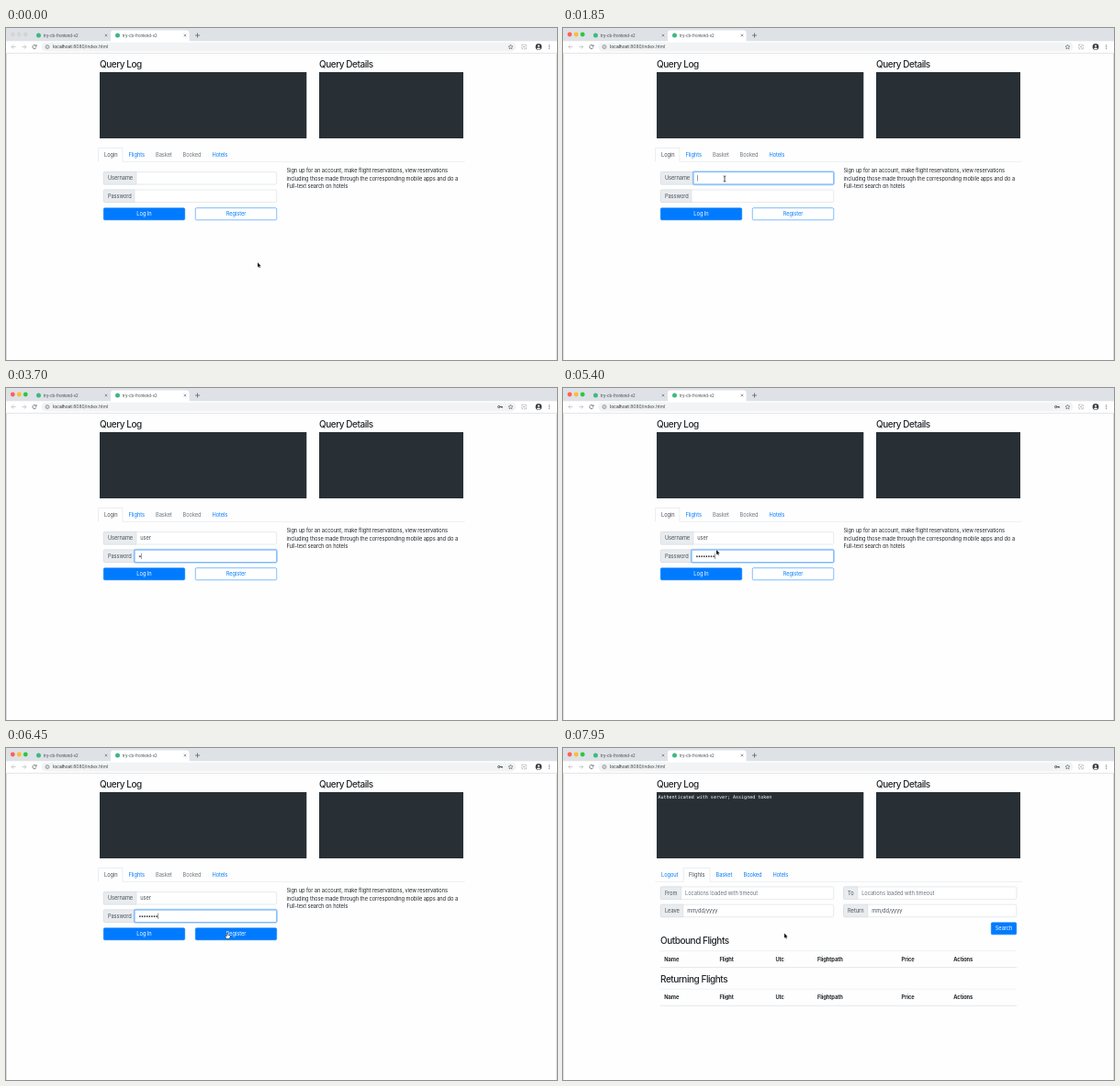
Write an HTML page with a canvas that moves like this. It is 600 px wide and 361 px high and loops after 8000 ms.

```html
<!DOCTYPE html>
<html lang="en">
<head>
<meta charset="utf-8">
<title>Login walkthrough</title>
<style>
html, body { margin: 0; width: 100%; height: 100%; overflow: hidden; background: #fefefe; }
canvas { display: block; width: 600px; height: 361px; }
</style>
</head>
<body>
<canvas id="stage"></canvas>
<script>
const W = 600, H = 361, LOOP = 8000;
const canvas = document.getElementById('stage');
const dpr = window.devicePixelRatio || 1;
canvas.width = W * dpr;
canvas.height = H * dpr;
const ctx = canvas.getContext('2d');

const SANS = 'Inter, "Open Sans", sans-serif';
const MONO = '"DejaVu Sans Mono", monospace';
const BODY = 5.71, HEAD = 10;
const BLUE = '#007bff', INK = '#212529', MUTED = '#6c757d', FIELD_INK = '#495057', LINE = '#dee2e6';

// Moments of the story in ms
const CLICK = 500, TAB_KEY = 3200, SUBMIT = 6850, SWITCH = 6950, KEY_ICON = 3600;
const NAME = 'user';
const nameKeys = [2300, 2620, 2820, 3000];
const passKeys = Array.from({ length: 8 }, (_, i) => 3600 + i * 200);

const cursorPath = [
  [0, 274, 255], [149, 274, 255], [150, 202, 162], [350, 202, 162], [480, 176, 164],
  [5180, 176, 164], [5400, 167, 176], [5650, 155, 202], [5950, 172, 211],
  [6100, 185, 207], [6400, 241, 201.5]
];
const loginButton = [106, 195.4, 89, 13.6];
const registerButton = [206, 195.4, 89, 13.6];

const clamp = v => Math.max(0, Math.min(1, v));
const ramp = (t, from, to) => clamp((t - from) / (to - from));
const typed = (keys, t) => keys.filter(k => k <= t).length;
const inside = (p, [x, y, w, h]) => p.x >= x && p.x <= x + w && p.y >= y && p.y <= y + h;

function text(str, x, y, { size = BODY, color = INK, weight = 400, family = SANS, align = 'left', track = -0.011 } = {}) {
  ctx.font = `${weight} ${size}px ${family}`;
  ctx.letterSpacing = `${track * size}px`;
  ctx.textAlign = align;
  ctx.textBaseline = 'alphabetic';
  ctx.fillStyle = color;
  ctx.fillText(str, x, y + size * 0.36);
}
const heading = (str, x, y) => text(str, x, y, { size: HEAD, track: -0.046, weight: 450 });

function box(x, y, w, h, fill, stroke, radius = 1.4, width = 0.5) {
  ctx.beginPath();
  ctx.roundRect(x, y, w, h, radius);
  if (fill) { ctx.fillStyle = fill; ctx.fill(); }
  if (stroke) { ctx.strokeStyle = stroke; ctx.lineWidth = width; ctx.stroke(); }
}

function dot(x, y, r, fill) {
  ctx.beginPath();
  ctx.arc(x, y, r, 0, 7);
  ctx.fillStyle = fill;
  ctx.fill();
}

function lines(color, width, ...paths) {
  ctx.beginPath();
  for (const p of paths) {
    for (let i = 0; i < p.length; i += 2) ctx[i ? 'lineTo' : 'moveTo'](p[i], p[i + 1]);
  }
  ctx.strokeStyle = color;
  ctx.lineWidth = width;
  ctx.stroke();
}

function ring(x, y, r, color, width, from = 0, to = 7) {
  ctx.beginPath();
  ctx.arc(x, y, r, from, to);
  ctx.strokeStyle = color;
  ctx.lineWidth = width;
  ctx.stroke();
}

function browserTab(x, active) {
  if (active) {
    box(x, 2.5, 85.5, 13, '#fff', null, [3, 3, 0, 0]);
  }
  dot(x + 7.5, 8, 2.5, '#41b883');
  text('try-cb-frontend-v2', x + 13, 8, { size: 4.28, color: '#3c4043' });
  const cx = x + 81, c = 1.3;
  lines('#5f6368', 0.6, [cx - c, 8 - c, cx + c, 8 + c], [cx + c, 8 - c, cx - c, 8 + c]);
}

function star(cx, cy) {
  ctx.beginPath();
  for (let i = 0; i < 10; i++) {
    const a = -Math.PI / 2 + i * Math.PI / 5, r = i % 2 ? 1.2 : 2.6;
    ctx.lineTo(cx + r * Math.cos(a), cy + r * Math.sin(a));
  }
  ctx.closePath();
  ctx.strokeStyle = '#5f6368';
  ctx.lineWidth = 0.6;
  ctx.stroke();
}

function browser(t) {
  ctx.fillStyle = '#dee1e6';
  ctx.fillRect(0, 0, W, 14.5);
  ctx.fillStyle = '#fff';
  ctx.fillRect(0, 14.5, W, 12.5);
  const lights = t < CLICK - 50 ? ['#d9d3d4', '#d9d5d0', '#d1d6d2'] : ['#ff5f57', '#febc2e', '#28c840'];
  lights.forEach((c, i) => dot(7.3 + i * 7, 7, 2.4, c));
  browserTab(28, false);
  browserTab(114, true);
  lines('#5f6368', 0.8, [206, 8, 211, 8], [208.5, 5.5, 208.5, 10.5]);

  const grey = '#5f6368', pale = '#bdc1c6';
  lines(pale, 0.8, [10.5, 20.5, 6, 20.5], [8.2, 18.3, 6, 20.5, 8.2, 22.7]);
  lines(pale, 0.8, [17.5, 20.5, 22, 20.5], [19.8, 18.3, 22, 20.5, 19.8, 22.7]);
  ring(31, 20.5, 2.1, grey, 0.8, 0.4, 5.6);
  lines(grey, 0.8, [33.2, 18.2, 33.2, 19.9, 31.5, 19.9]);
  box(38.5, 15.7, 517, 9.8, '#f1f3f4', null, 5);
  ring(45, 20.5, 2, grey, 0.6);
  lines(grey, 0.6, [45, 20.2, 45, 21.6], [45, 19.2, 45, 19.7]);
  text('localhost', 51, 20.5, { size: 5, color: INK });
  const hostWidth = ctx.measureText('localhost').width;
  text(':8080/index.html', 51 + hostWidth, 20.5, { size: 5, color: '#44484c' });

  if (t >= KEY_ICON) {
    ring(536.7, 20.5, 1.1, '#3c4043', 0.9);
    lines('#3c4043', 0.9, [537.8, 20.5, 540.8, 20.5], [540, 20.5, 540, 21.8]);
  }
  star(549.5, 20.7);
  ctx.setLineDash([1.5, 1]);
  box(561.8, 18.2, 4.6, 4.6, null, '#777', 0, 0.6);
  ctx.setLineDash([]);
  dot(564.1, 20.5, 0.8, '#999');
  dot(580, 20.5, 3.4, '#3c4043');
  dot(580, 19.6, 1.1, '#fff');
  ctx.beginPath();
  ctx.ellipse(580, 22.4, 1.9, 1, 0, 0, 7);
  ctx.fill();
  [-1.8, 0, 1.8].forEach(d => dot(591.5, 20.5 + d, 0.55, grey));
  lines('#dadce0', 0.7, [0, 27.4, W, 27.4]);
}

function queryPanels(t) {
  heading('Query Log', 102, 39.5);
  heading('Query Details', 341, 39.5);
  ctx.fillStyle = '#283035';
  ctx.fillRect(102, 48, 225.3, 72);
  ctx.fillRect(341, 48, 157, 72);
  if (t >= SWITCH) {
    text('Authenticated with server; Assigned token', 103.5, 53.2,
      { size: 5.03, family: MONO, color: '#fff', track: 0 });
  }
}

function tabs(t) {
  const signedIn = t >= SWITCH;
  const items = signedIn
    ? [['Logout', 107], ['Flights', 137], ['Basket', 166.5], ['Booked', 196.5], ['Hotels', 228.5]]
    : [['Login', 107], ['Flights', 133.5], ['Basket', 163], ['Booked', 192.5], ['Hotels', 224.5]];
  const [left, right] = signedIn ? [131.2, 160] : [100.5, 127];
  lines(LINE, 0.6, [100.5, 145.3, left, 145.3], [right, 145.3, 499.5, 145.3],
    [left, 145.3, left, 130.5, right, 130.5, right, 145.3]);
  items.forEach(([label, x], i) => {
    const active = i === (signedIn ? 1 : 0);
    const disabled = !signedIn && (i === 2 || i === 3);
    text(label, x, 137.8, { color: active ? FIELD_INK : disabled ? MUTED : BLUE });
  });
}

function field(label, x, y, split, right, focus = 0) {
  const h = 13.5;
  box(x, y, right - x, h, '#fff', '#ced4da');
  box(x, y, split - x, h, '#e9ecef', '#ced4da', [1.4, 0, 0, 1.4]);
  text(label, x + 4.6, y + h / 2, { color: FIELD_INK });
  if (focus > 0) {
    ctx.save();
    ctx.globalAlpha *= focus;
    box(split - 0.4, y - 0.4, right - split + 0.8, h + 0.8, null, 'rgba(0,123,255,.3)', 1.6, 1.6);
    box(split, y, right - split, h, null, '#6fb3ff', 1.2, 0.7);
    ctx.restore();
  }
}

function caret(x, y, t, since) {
  if (Math.floor((t - since) / 500) % 2 === 0) lines('#333', 0.5, [x, y - 3.2, x, y + 3.2]);
}

function button(label, [x, y, w, h], fill, color) {
  box(x + 0.25, y + 0.25, w - 0.5, h - 0.5, fill, fill === '#fff' ? BLUE : fill);
  text(label, x + w / 2, y + h / 2, { color, align: 'center' });
}

function loginForm(t, pointer) {
  const nameFocus = ramp(t, CLICK, CLICK + 150) * (1 - ramp(t, TAB_KEY, TAB_KEY + 150));
  const passFocus = ramp(t, TAB_KEY, TAB_KEY + 150) * (1 - ramp(t, SUBMIT, SUBMIT + 150));
  field('Username', 106.3, 156.5, 142, 294.7, nameFocus);
  field('Password', 106.3, 176, 140, 294.7, passFocus);

  const chars = typed(nameKeys, t), dots = typed(passKeys, t);
  const shown = NAME.slice(0, chars);
  text(shown, 146.3, 163.3, { color: FIELD_INK });
  if (t >= CLICK && t < TAB_KEY) {
    const end = 146.5 + (chars ? ctx.measureText(shown).width : 0);
    caret(end, 163.3, t, chars ? nameKeys[chars - 1] : CLICK);
  }
  for (let i = 0; i < dots; i++) dot(145.9 + i * 2.6, 183.1, 0.85, INK);
  if (t >= TAB_KEY && t < SUBMIT) {
    caret(144.8 + dots * 2.6, 182.8, t, dots ? passKeys[dots - 1] : TAB_KEY);
  }

  const overRegister = inside(pointer, registerButton);
  button('Log In', loginButton, inside(pointer, loginButton) ? '#0069d9' : BLUE, '#fff');
  button('Register', registerButton, overRegister ? BLUE : '#fff', overRegister ? '#fff' : BLUE);
  if (t >= SUBMIT) {
    const [x, y, w, h] = registerButton;
    box(x - 0.4, y - 0.4, w + 0.8, h + 0.8, null, 'rgba(0,123,255,.5)', 1.8, 1.1);
  }

  ['Sign up for an account, make flight reservations, view reservations',
   'including those made through the corresponding mobile apps and do a',
   'Full-text search on hotels'
  ].forEach((line, i) => text(line, 305.5, 155.2 + i * 8.57));
}

function flightTable(title, y) {
  heading(title, 106, y);
  lines(LINE, 0.5, [106, y + 11, 494, y + 11]);
  lines(LINE, 0.8, [106, y + 29, 494, y + 29]);
  const columns = { Name: 110.3, Flight: 170.5, Utc: 231.5, Flightpath: 277, Price: 368.5, Actions: 425.3 };
  for (const [label, x] of Object.entries(columns)) text(label, x, y + 20.1, { weight: 700 });
}

function flights() {
  field('From', 106.3, 150.9, 128.6, 294.7);
  field('To', 305.5, 150.9, 320.8, 493.8);
  field('Leave', 106.3, 170.2, 130.8, 294.7);
  field('Return', 305.5, 170.2, 331.8, 493.8);
  text('Locations loaded with timeout', 133, 157.6, { color: MUTED });
  text('Locations loaded with timeout', 325.2, 157.6, { color: MUTED });
  text('mm/dd/yyyy', 135.2, 177, { color: FIELD_INK });
  text('mm/dd/yyyy', 336.2, 177, { color: FIELD_INK });
  button('Search', [466, 189.5, 28, 13.6], BLUE, '#fff');
  flightTable('Outbound Flights', 209.6);
  flightTable('Returning Flights', 251.2);
}

function pointerAt(t) {
  const next = cursorPath.findIndex(k => k[0] > t);
  if (next < 0) {
    const [, x, y] = cursorPath[cursorPath.length - 1];
    return { x, y };
  }
  const [t0, x0, y0] = cursorPath[next - 1], [t1, x1, y1] = cursorPath[next];
  const u = ramp(t, t0, t1), e = u * u * (3 - 2 * u);
  return { x: x0 + (x1 - x0) * e, y: y0 + (y1 - y0) * e };
}

function shape(points, fill, stroke) {
  ctx.beginPath();
  for (let i = 0; i < points.length; i += 2) ctx.lineTo(points[i], points[i + 1]);
  ctx.closePath();
  ctx.lineJoin = 'round';
  ctx.strokeStyle = stroke;
  ctx.lineWidth = 0.9;
  ctx.stroke();
  ctx.fillStyle = fill;
  ctx.fill();
}

function cursor(t, p) {
  if (t >= nameKeys[0] && t < 5180) return;
  ctx.save();
  ctx.translate(p.x, p.y);
  const overButton = t < SWITCH + 150 && (inside(p, loginButton) || inside(p, registerButton));
  if (t >= 450 && t < nameKeys[0]) {
    lines('#222', 0.8, [0, -2.6, 0, 2.6], [-1.3, -3.1, 0, -2.6, 1.3, -3.1], [-1.3, 3.1, 0, 2.6, 1.3, 3.1]);
  } else if (overButton) {
    shape([-0.5, 0, 0.4, 0, 0.5, 2, 2.8, 2.6, 2.8, 4.3, 2, 5.8, -0.6, 5.8, -2.2, 3.5, -1.6, 3, -0.5, 3.8], '#fff', '#111');
  } else {
    shape([0, 0, 0, 5.2, 1.2, 4.1, 2, 5.9, 2.8, 5.5, 2.1, 3.8, 3.7, 3.7], '#111', '#fff');
  }
  ctx.restore();
}

function draw(t) {
  ctx.setTransform(dpr, 0, 0, dpr, 0, 0);
  ctx.fillStyle = '#fefefe';
  ctx.fillRect(0, 0, W, H);
  browser(t);
  queryPanels(t);
  tabs(t);
  const pointer = pointerAt(t);
  ctx.globalAlpha = 1 - ramp(t, SWITCH, SWITCH + 150);
  if (ctx.globalAlpha > 0) loginForm(t, pointer);
  ctx.globalAlpha = ramp(t, 7100, 7310);
  if (ctx.globalAlpha > 0) flights();
  ctx.globalAlpha = 1;
  lines('#b8babd', 0.6, [0.3, 28, 0.3, H], [W - 0.3, 28, W - 0.3, H]);
  cursor(t, pointer);
}

const start = performance.now();
function tick() {
  draw((performance.now() - start) % LOOP);
  requestAnimationFrame(tick);
}
tick();
</script>
</body>
</html>
```
